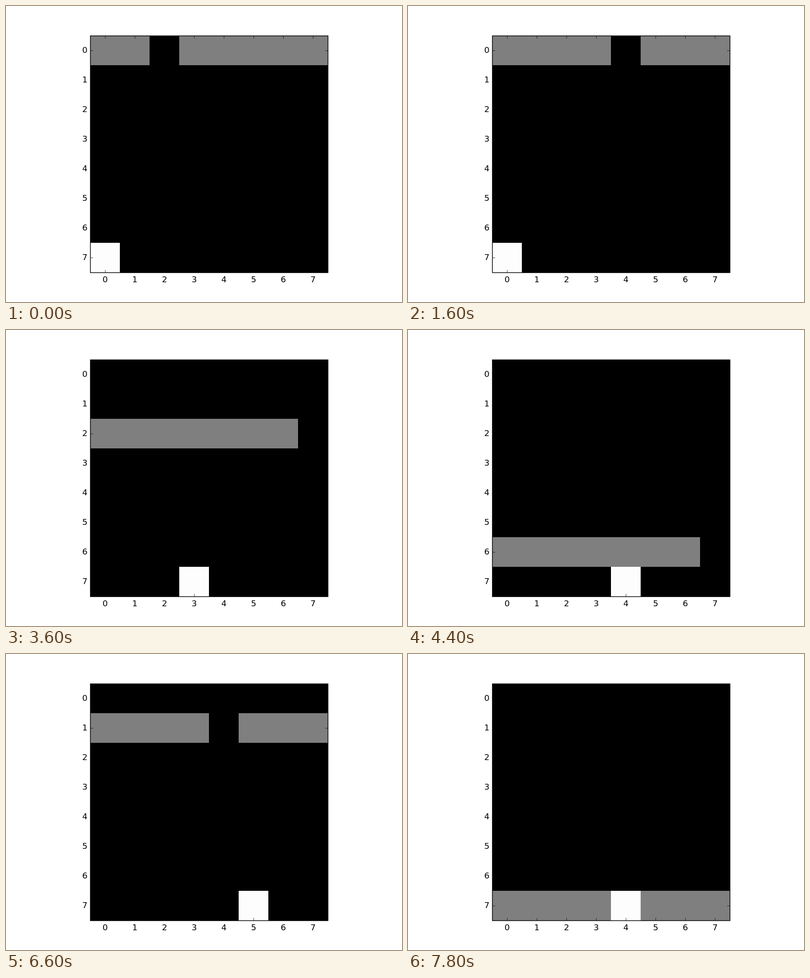
An HTML page that plays this animation: 800x600 px, repeating every 8 s.

```html
<!DOCTYPE html>
<html lang="en">
<head>
<meta charset="utf-8">
<title>Falling wall grid</title>
<style>
  html, body { margin: 0; width: 100%; height: 100%; overflow: hidden; background: #fff; }
  svg { display: block; width: 800px; height: 600px; }
  text { font: 16.67px "DejaVu Sans", sans-serif; }
</style>
</head>
<body>
<svg id="stage" viewBox="0 0 800 600">
  <rect width="800" height="600" fill="#fff"/>
  <rect x="170" y="60" width="480" height="480"/>
  <g id="wall" fill="#7f7f7f" shape-rendering="crispEdges">
    <rect id="left" x="170" height="60"/>
    <rect id="right" height="60"/>
  </g>
  <rect id="player" y="480" width="60" height="60" fill="#fdfdfd" shape-rendering="crispEdges"/>
  <path id="ticks" stroke="#000" stroke-width="0.69"/>
  <rect x="170.5" y="60.5" width="480" height="480" fill="none" stroke="#000" stroke-width="1.39"/>
  <g id="labels"></g>
</svg>
<script>
const STEP = 200, SIZE = 8, CELL = 60, X0 = 170, Y0 = 60;
const GAPS = [2, 4, 7, 7, 4];
// player column at every step, one group per falling wall
const WALK = ["00111100", "00011112", "22333444", "44444455", "55555444"].join("");

const $ = id => document.getElementById(id);
const set = (el, attrs) => {
  for (const key in attrs) el.setAttribute(key, attrs[key]);
};

function label(x, y, anchor, text) {
  const el = document.createElementNS($("stage").namespaceURI, "text");
  set(el, { x, y, "text-anchor": anchor });
  el.textContent = text;
  $("labels").append(el);
}

function buildAxes() {
  let d = "";
  for (let i = 0; i < SIZE; i++) {
    const x = X0 + CELL * (i + 0.5) + 0.5, y = Y0 + CELL * (i + 0.5) + 0.5;
    d += `M${x} 60.5v5.56M${x} 540.5v-5.56M170.5 ${y}h5.56M650.5 ${y}h-5.56`;
    label(x - 0.3, 560, "middle", i);
    label(164.6, y + 4.5, "end", i);
  }
  set($("ticks"), { d });
}

function draw(ms) {
  const step = Math.floor(ms / STEP) % WALK.length;
  const y = Y0 + CELL * (step % SIZE);
  const gap = GAPS[Math.floor(step / SIZE)];
  set($("left"), { y, width: gap * CELL });
  set($("right"), { y, x: X0 + (gap + 1) * CELL, width: (SIZE - 1 - gap) * CELL });
  set($("player"), { x: X0 + CELL * WALK[step] });
}

buildAxes();
draw(0);
const start = performance.now();
(function tick() {
  draw(performance.now() - start);
  requestAnimationFrame(tick);
})();
</script>
</body>
</html>
```
